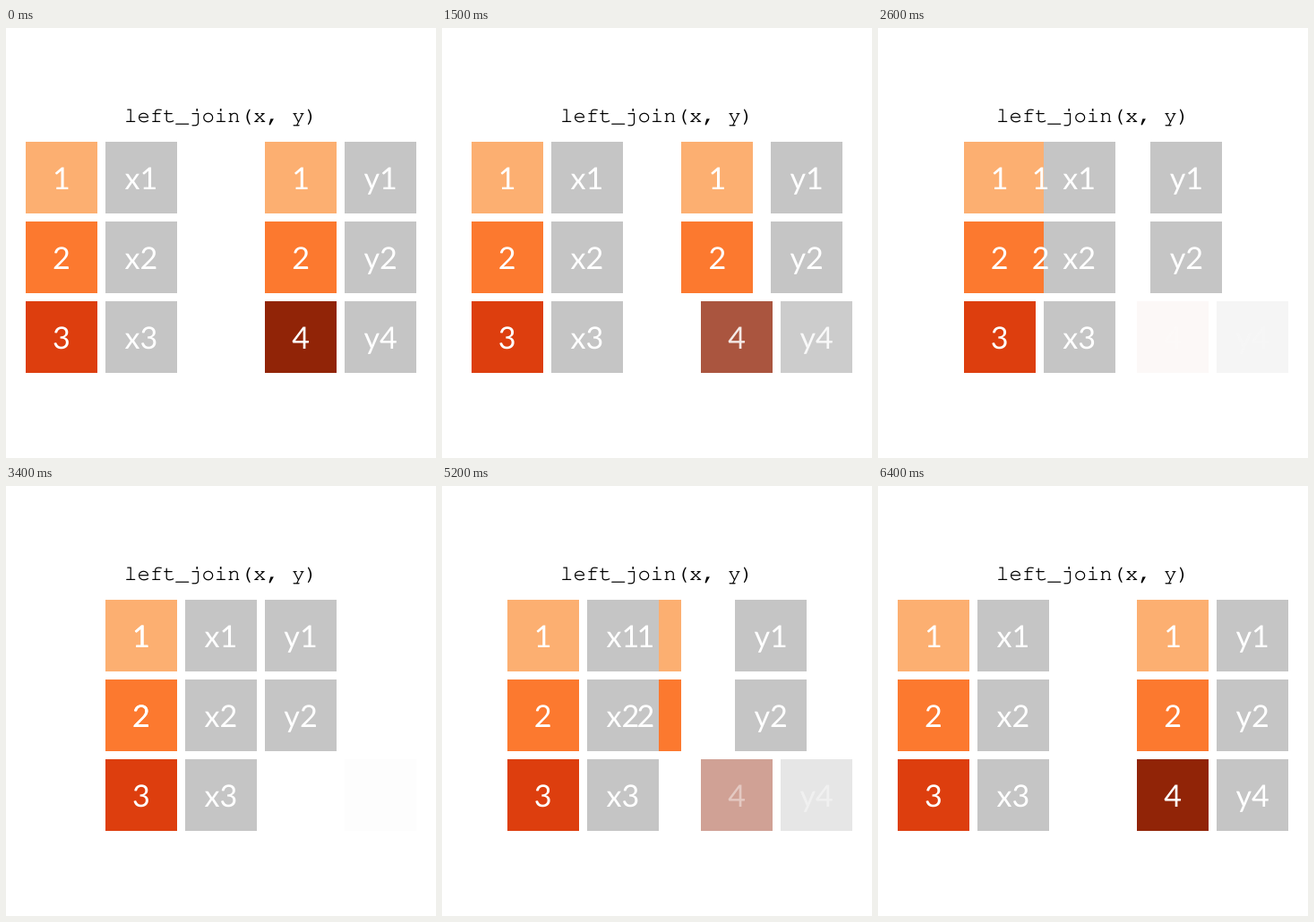
An HTML page that plays this animation: 480 by 480 pixels, repeating every 6500 ms.

```html
<!DOCTYPE html>
<html lang="en">
<head>
<meta charset="utf-8">
<title>left_join(x, y)</title>
<style>
  html, body { margin: 0; width: 100%; height: 100%; overflow: hidden; background: #fff; }
  svg { display: block; width: 100%; height: 100%; }
  text { text-anchor: middle; text-rendering: geometricPrecision; }
  .label { font: 34.14px Lato, sans-serif; fill: #fff; }
  .title { font: 24px "Courier Prime", "Nimbus Mono PS", FreeMono, "Liberation Mono", monospace; fill: #000; }
</style>
</head>
<body>
<svg viewBox="0 0 480 480">
  <text class="title" x="240" y="105">left_join(x, y)</text>
  <g id="tiles"></g>
  <g id="labels"></g>
</svg>
<script>
const LOOP = 6500, STEP = 100, MOVE = 2200, JOIN_AT = 1000, SPLIT_AT = 4200;
const PITCH = 89.05, SIZE = 80.15, LEFT = 21.82, TOP = 127;
const KEY_COLORS = { 1: '#fcaf71', 2: '#fc792f', 3: '#dd3e0e', 4: '#912407' };
const GREY = '#c5c5c5';

// Columns in paint order; shift is the travel in columns when joined.
const columns = [
  { col: 3, shift: -2, prefix: '', ids: [1, 2, 4] },
  { col: 0, shift: 1, prefix: '', ids: [1, 2, 3] },
  { col: 1, shift: 1, prefix: 'x', ids: [1, 2, 3] },
  { col: 4, shift: -1, prefix: 'y', ids: [1, 2, 4] },
];

function add(parent, tag, attrs) {
  const node = document.createElementNS('http://www.w3.org/2000/svg', tag);
  for (const name in attrs) node.setAttribute(name, attrs[name]);
  return document.getElementById(parent).appendChild(node);
}

const cells = columns.flatMap(({ col, shift, prefix, ids }) => ids.map((id, row) => {
  const y = TOP + row * 89;
  const fades = id === 4;
  const tile = add('tiles', 'rect', { y, height: 80, fill: prefix ? GREY : KEY_COLORS[id] });
  const label = add('labels', 'text', { class: 'label', y: y + 53 });
  label.textContent = prefix + id;
  return { tile, label, col, shift: fades ? 0 : shift, fades, isKey: !prefix };
}));

const ease = t => (1 - Math.cos(Math.PI * Math.min(1, Math.max(0, t)))) / 2;

function draw(time) {
  const now = Math.floor(time % LOOP / STEP) * STEP;
  const splitting = now > SPLIT_AT;
  const joined = splitting ? 1 - ease((now - SPLIT_AT) / MOVE) : ease((now - JOIN_AT) / MOVE);
  const alpha = 1 - joined;

  for (const { tile, label, col, shift, fades, isKey } of cells) {
    const x = LEFT + (col + shift * joined) * PITCH;
    const left = Math.round(x);
    tile.setAttribute('x', left);
    tile.setAttribute('width', Math.round(x + SIZE) - left);
    label.setAttribute('x', x + SIZE / 2);
    if (fades) {
      const keyAlpha = splitting ? alpha : alpha * alpha;
      tile.setAttribute('opacity', isKey ? keyAlpha : Math.max(alpha, 0.04));
      label.setAttribute('opacity', alpha);
    }
  }
}

const start = performance.now();
function tick() {
  draw(performance.now() - start);
  requestAnimationFrame(tick);
}
tick();
</script>
</body>
</html>
```
